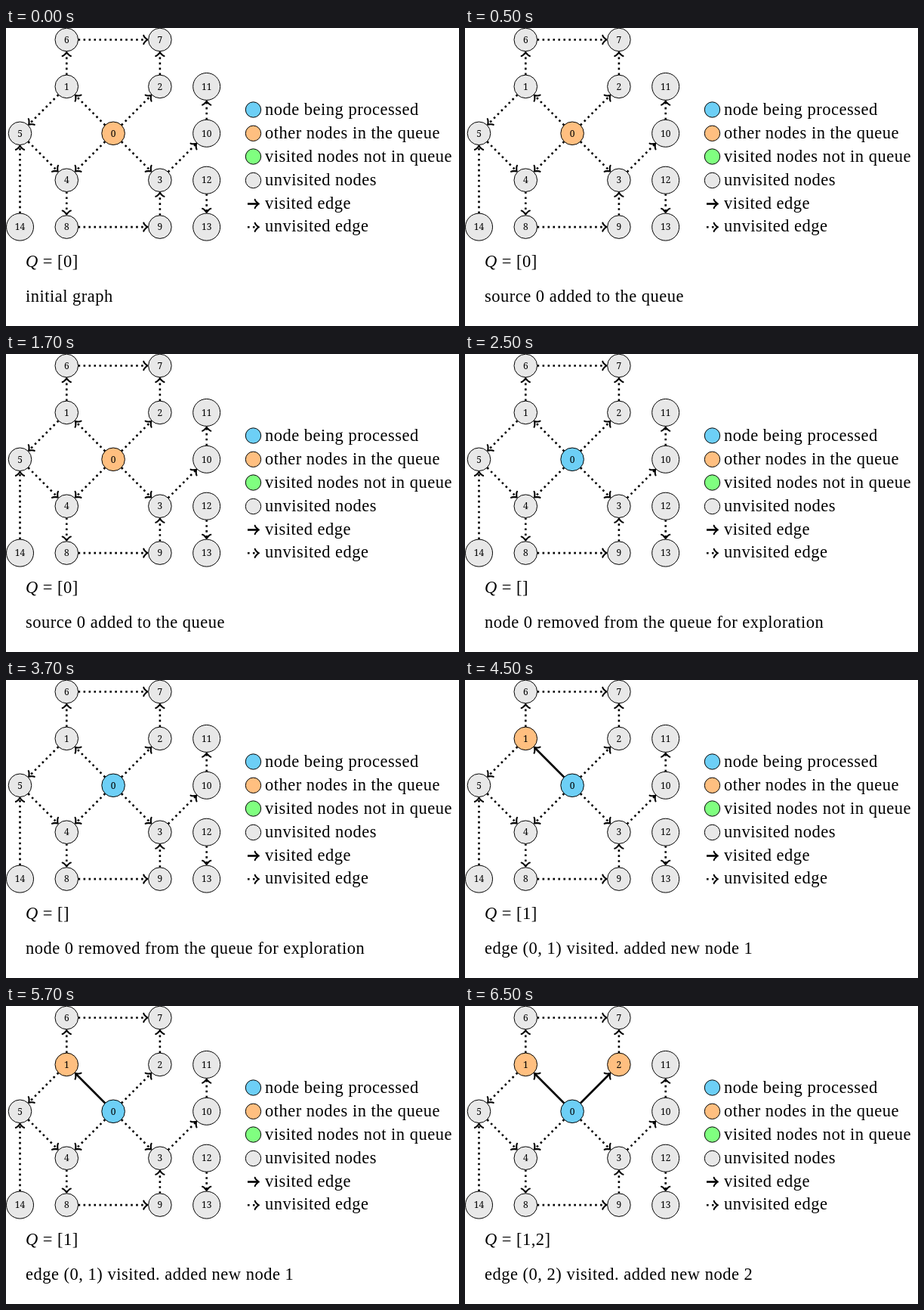
Write an HTML page that moves like this. It is 600 px wide and 394 px high and loops after 8 s.

```html
<!DOCTYPE html>
<html lang="en">
<head>
<meta charset="utf-8">
<title>Breadth-first search</title>
<style>
  html, body { margin: 0; width: 100%; height: 100%; overflow: hidden; background: #fff; }
  svg { display: block; width: 100%; height: 100%; }
  text { font: 22.5px "Liberation Serif", serif; letter-spacing: .5px; white-space: pre; }
  .label { font: 12px "Noto Serif", serif; letter-spacing: 0; text-anchor: middle; }
  .math { font-style: italic; }
  circle { stroke: #000; stroke-width: 1; }
  path { fill: none; stroke: #000; stroke-width: 2.6; }
  .dotted { stroke-dasharray: 2.6 4.36; }
  .head { stroke-width: 2.1; stroke-linecap: round; stroke-linejoin: round; }
</style>
</head>
<body>
<svg id="stage" viewBox="0 0 600 394"></svg>
<script>
const stage = document.getElementById('stage');
const BLUE = '#6dcff6', ORANGE = '#ffbf80', GREEN = '#80ff80', GREY = '#e8e8e8';

// Column and row of each node
const cells = [[2, 2], [1, 1], [3, 1], [3, 3], [1, 3], [0, 2], [1, 0], [3, 0],
  [1, 4], [3, 4], [4, 2], [4, 1], [4, 3], [4, 4], [0, 4]];
const links = [[0, 1], [0, 2], [0, 3], [0, 4], [1, 5], [1, 6], [2, 7], [3, 10],
  [4, 8], [5, 4], [6, 7], [8, 9], [9, 3], [10, 11], [12, 13], [14, 5]];

// Each step: start time, current node, queue, visited neighbours of node 0, message
const steps = [
  [0, -1, [0], [], 'initial graph'],
  [500, -1, [0], [], 'source 0 added to the queue'],
  [2500, 0, [], [], 'node 0 removed from the queue for exploration'],
  [4500, 0, [1], [1], 'edge (0, 1) visited. added new node 1'],
  [6500, 0, [1, 2], [1, 2], 'edge (0, 2) visited. added new node 2']
];
const LOOP = 8000;

function add(tag, attrs, content = '') {
  const el = document.createElementNS('http://www.w3.org/2000/svg', tag);
  for (const key in attrs) el.setAttribute(key, attrs[key]);
  el.textContent = content;
  return stage.appendChild(el);
}

const disc = (cx, cy, r, fill) => add('circle', { cx, cy, r, fill });
const write = (x, y, content) => add('text', { x, y }, content);

function arrow(x, y, angle, length, dotted) {
  const transform = `translate(${x} ${y}) rotate(${angle * 180 / Math.PI})`;
  const tip = length - 1.1;
  const line = add('path', { d: `M0 0H${tip - 1}`, transform, class: dotted ? 'dotted' : '' });
  add('path', {
    d: `M${tip - 5.2} -5.6c.35 2.1 4.2 5.25 5.2 5.6c-1 .35-4.85 3.5-5.2 5.6`,
    transform, class: 'head'
  });
  return line;
}

const nodes = cells.map(([col, row], i) => ({
  x: 18.5 + 61.8 * col, y: 15.5 + 61.9 * row, r: i < 10 ? 15.3 : 18
}));

const edges = links.map(([from, to]) => {
  const a = nodes[from], b = nodes[to];
  const angle = Math.atan2(b.y - a.y, b.x - a.x);
  const gap = Math.hypot(b.x - a.x, b.y - a.y) - a.r - b.r;
  const line = arrow(a.x + a.r * Math.cos(angle), a.y + a.r * Math.sin(angle), angle, gap, true);
  return { from, to, line };
});

nodes.forEach((node, i) => {
  node.disc = disc(node.x, node.y, node.r, GREY);
  add('text', { x: node.x, y: node.y + 4.2, class: 'label' }, i);
});

[[BLUE, 108, 'node being processed'], [ORANGE, 139.3, 'other nodes in the queue'],
  [GREEN, 170, 'visited nodes not in queue'], [GREY, 201.5, 'unvisited nodes']
].forEach(([fill, y, caption]) => {
  disc(327.5, y, 10.2, fill);
  write(343, y + 6.7, caption);
});
arrow(320, 232.5, 0, 16, false);
write(343, 238.5, 'visited edge');
arrow(320, 263.3, 0, 16, true);
write(343, 269.3, 'unvisited edge');

add('text', { x: 26, y: 316, class: 'math' }, 'Q');
const queueText = write(42.5, 316, '');
const message = write(26, 361.5, '');

let shown;
function show(step) {
  if (step === shown) return;
  shown = step;
  const [, current, queue, visited, caption] = step;
  nodes.forEach((node, i) => node.disc.setAttribute('fill',
    i === current ? BLUE : queue.includes(i) ? ORANGE : GREY));
  edges.forEach(({ from, to, line }) =>
    line.classList.toggle('dotted', from !== 0 || !visited.includes(to)));
  queueText.textContent = ` = [${queue.join(',')}]`;
  message.textContent = caption;
}

const start = performance.now();
function frame() {
  const t = (performance.now() - start) % LOOP;
  show(steps.filter(([time]) => time <= t).pop());
  requestAnimationFrame(frame);
}
frame();
</script>
</body>
</html>
```
